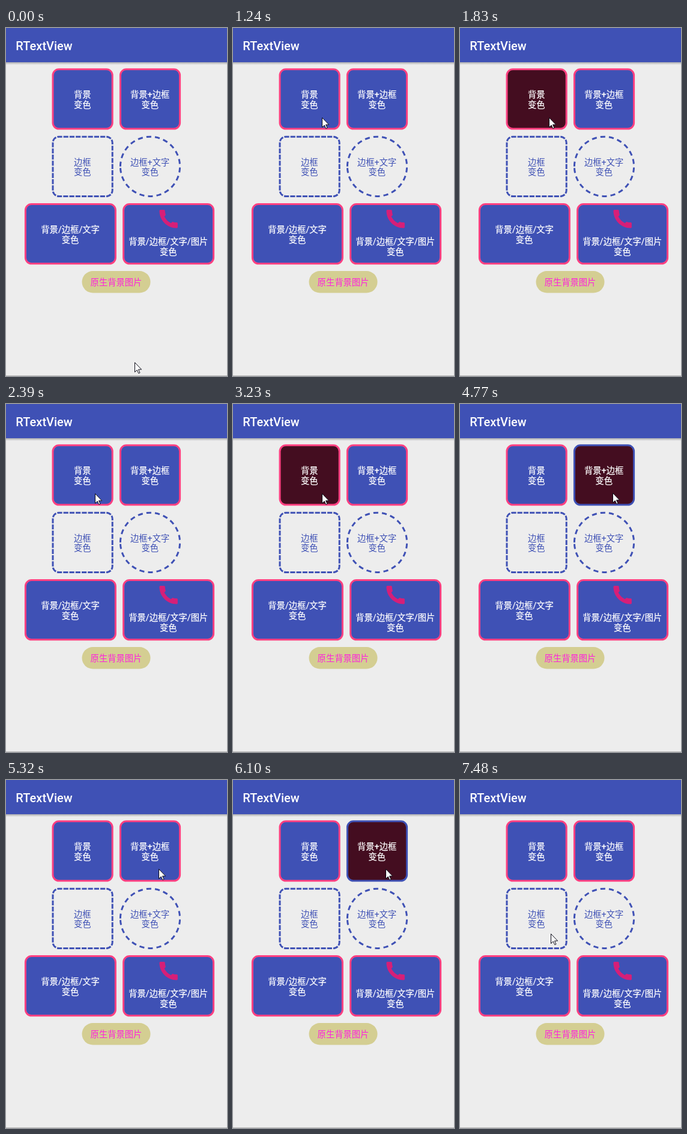
An HTML page for the animation above (8000 ms loop, 368 px wide and 580 px high).

```html
<!DOCTYPE html>
<html lang="zh-CN">
<head>
<meta charset="utf-8">
<title>RTextView</title>
<style>
  html, body { margin: 0; width: 100%; height: 100%; overflow: hidden; background: #ededed; }
  svg { display: block; width: 368px; height: 580px; }
  text { font: 14.3px Roboto, "Noto Sans CJK SC", "Noto Sans CJK", sans-serif; text-anchor: middle; }
  .title { font: 500 20px Roboto, sans-serif; text-anchor: start; fill: #fff; }
  .view path { fill: none; stroke: #3f51b5; stroke-width: 3; }
  .view text { fill: #3f51b5; }
  .card path { fill: #3f51b5; stroke: #ff4081; }
  .card text { fill: #fff; stroke: #fff; stroke-width: .25; }
  .pressed path { fill: #440d20; }
  .pressed.swap path { stroke: #3f51b5; }
</style>
</head>
<body>
<svg viewBox="0 0 368 580">
  <defs>
    <linearGradient id="shadow" x2="0" y2="1">
      <stop stop-color="#acacae"/>
      <stop offset="1" stop-color="#ededed"/>
    </linearGradient>
  </defs>
  <rect width="368" height="580" fill="#ededed"/>
  <rect y="57" width="368" height="4.5" fill="url(#shadow)"/>
  <rect width="368" height="57" fill="#3f51b5"/>
  <text class="title" x="16.3" y="37">RTextView</text>
  <g id="views"></g>
  <path fill="#d61f78" transform="translate(250.4 297.9) scale(1.69)"
    d="M7.8 9.61c1.4 2.7 3.89 5.18 6.59 6.59l1.02-1.02c.27-.27.67-.36 1.02-.24 1.12.37 2.33.57 3.57.57.55 0 1 .45 1 1V20c0 .55-.45 1-1 1-9.39 0-17-7.61-17-17 0-.55.45-1 1-1h3.5c.55 0 1 .45 1 1 0 1.25.2 2.45.57 3.57.11.35.03.74-.25 1.02z"/>
  <rect x="126.5" y="405" width="114" height="36.5" rx="18.2" fill="#d4ce92"/>
  <text x="183.5" y="429" fill="#ff20dc">原生背景图片</text>
  <rect y="579" width="368" height="1" fill="#b4b4b4"/>
  <path id="cursor" d="M.5 .5V16.5L4.2 13 6.8 18.6 9 17.6 6.5 12.1H11.6Z" fill="#fff" stroke="#0c0c18"/>
</svg>
<script>
const LOOP = 8000, HOLD = 550;
const SIZE = 99.2, TOP = 68.8, ROW = 112.4;
const views = document.getElementById('views');
const cursor = document.getElementById('cursor');

// Rounded rectangle starting on the left edge, so dashes run clockwise from there
function roundRect(x, y, w, h, r) {
  const corner = (dx, dy) => `a${r} ${r} 0 0 1 ${dx * r} ${dy * r}`;
  return `M${x} ${y + h - r}V${y + r}${corner(1, -1)}H${x + w - r}${corner(1, 1)}` +
    `V${y + h - r}${corner(-1, 1)}H${x + r}${corner(-1, -1)}Z`;
}

function addView(kind, x, row, label, { width = SIZE, radius = 10, dash = 'none', baseline = 47.3 } = {}) {
  const view = document.createElementNS('http://www.w3.org/2000/svg', 'g');
  const y = TOP + row * ROW, mid = x + width / 2 - .3;
  view.setAttribute('class', `view ${kind}`);
  view.innerHTML = `
    <path d="${roundRect(x, y, width, SIZE, radius)}" stroke-dasharray="${dash}"/>
    <text x="${mid}" y="${y + baseline}">${label}</text>
    <text x="${mid}" y="${y + baseline + 16.7}">变色</text>`;
  views.append(view);
  return view;
}

const left = 78, right = left + ROW;
const first = addView('card', left, 0, '背景');
const second = addView('card swap', right, 0, '背景+边框');
addView('outline', left, 1, '边框', { dash: '8.2 2.04' });
addView('outline', right, 1, '边框+文字', { radius: SIZE / 2, dash: '8.2 6.1' });
addView('card', 32.4, 2, '背景/边框/文字', { width: 150 });
addView('card', 195.6, 2, '背景/边框/文字/图片', { width: 150, baseline: 67.6 });

// Each glide eases out to (x, y) in a few hard steps, the first at start and the last at end
const home = { x: 214, y: 557 };
const glides = [
  { start: 280, end: 520, steps: 3, x: 108, y: 224, power: 1 },
  { start: 670, end: 1240, steps: 5, x: 148, y: 149, power: 2.5 },
  { start: 4070, end: 4370, steps: 3, x: 254, y: 148, power: 4 },
  { start: 7060, end: 7480, steps: 4, x: 151, y: 256, power: 2 }
];

function pointerAt(t) {
  let { x, y } = home;
  for (const g of glides) {
    if (t < g.start) break;
    const progress = Math.min(1, (t - g.start) / (g.end - g.start));
    const step = Math.floor(progress * (g.steps - 1) + 1e-6) + 1;
    const eased = 1 - (1 - step / g.steps) ** g.power;
    x += (g.x - x) * eased;
    y += (g.y - y) * eased;
  }
  return [Math.round(x), Math.round(y)];
}

function press(view, t, ...starts) {
  view.classList.toggle('pressed', starts.some(start => t >= start && t < start + HOLD));
}

function frame(now) {
  const t = now % LOOP;
  cursor.setAttribute('transform', `translate(${pointerAt(t)})`);
  press(first, t, 1830, 3230);
  press(second, t, 4770, 6100);
  requestAnimationFrame(frame);
}
frame(0);
</script>
</body>
</html>
```
